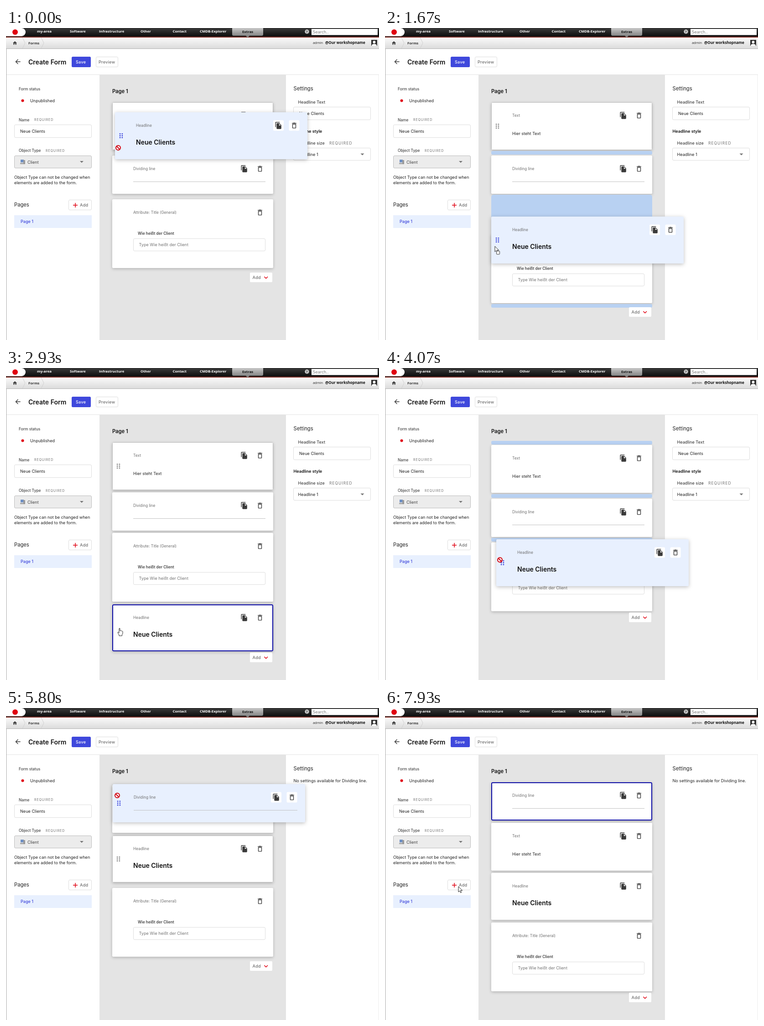
Recreate the animation shown at these times as an HTML page. Size 818 by 685 pixels, loop 8 s.

```html
<!DOCTYPE html>
<html lang="en">
<head>
<meta charset="utf-8">
<title>Form editor</title>
<style>
  html, body { margin: 0; width: 100%; height: 100%; overflow: hidden; background: #fff; }
  svg { display: block; }
  text { font-family: Inter, sans-serif; white-space: pre; }
  .bar { font-family: "Open Sans", sans-serif; }
  .search { font-family: "DejaVu Sans", sans-serif; }
  .card { filter: drop-shadow(0 2px 3px rgba(0, 0, 0, .22)); }
  .ghost { filter: drop-shadow(0 2px 4px rgba(0, 0, 0, .25)); }
</style>
</head>
<body>
<svg width="818" height="685" viewBox="0 0 818 685">
  <defs>
    <linearGradient id="dark" x2="0" y2="1"><stop stop-color="#3a3a3a"/><stop offset="1" stop-color="#0c0c0c"/></linearGradient>
    <linearGradient id="tab" x2="0" y2="1"><stop stop-color="#c9c9c9"/><stop offset="1" stop-color="#858585"/></linearGradient>
    <linearGradient id="crumbs" x2="0" y2="1"><stop stop-color="#fafafa"/><stop offset="1" stop-color="#dcdcdc"/></linearGradient>
  </defs>
  <g id="page"></g>
  <g id="live"></g>
</svg>
<script>
const LOOP = 8000;
const BLUE = '#3f48dc', RED = '#e00010', GREY = '#6f6f6f', INK = '#222', PALE = '#e8f0fe';
const ICONS = {
  copy: 'M16 1H4c-1.1 0-2 .9-2 2v14h2V3h12V1zm-1 4l6 6v10c0 1.1-.9 2-2 2H7.99C6.89 23 6 22.1 6 21l.01-14c0-1.1.89-2 1.99-2h7zm-1 7h5.5L14 6.5V12z',
  trash: 'M6 19c0 1.1.9 2 2 2h8c1.1 0 2-.9 2-2V7H6v12zM8 9h8v10H8V9zm7.5-5l-1-1h-5l-1 1H5v2h14V4z',
  back: 'M20 11H7.83l5.59-5.59L12 4l-8 8 8 8 1.41-1.41L7.83 13H20v-2z',
  home: 'M10 20v-6h4v6h5v-8h3L12 3 2 12h3v8z',
};

// y is the vertical middle of the capitals
const text = (x, y, str, size = 9.1, weight = 400, fill = INK, extra = '') =>
  `<text x="${x}" y="${y + size * .364}" font-size="${size}" font-weight="${weight}" fill="${fill}" ${extra}>${str}</text>`;
const rect = (x, y, w, h, fill, extra = '') =>
  `<rect x="${x}" y="${y}" width="${w}" height="${h}" fill="${fill}" ${extra}/>`;
const box = (x, y, w, h, fill = '#fff', stroke = '#dedede') =>
  rect(x + .5, y + .5, w - 1, h - 1, fill, `rx="2.5" stroke="${stroke}"`);
const path = (d, fill, extra = '') => `<path d="${d}" fill="${fill}" ${extra}/>`;
const line = (d, stroke, width) => path(d, 'none', `stroke="${stroke}" stroke-width="${width}"`);
const icon = (name, x, y, fill = '#3a3a3a', size = 16.8) =>
  path(ICONS[name], fill, `transform="translate(${x - size / 2} ${y - size / 2}) scale(${size / 24})"`);
const caret = (x, y) => path(`M${x - 4} ${y - 2}h8l-4 4z`, '#757575');
const required = (x, y, size) => text(x, y, 'REQUIRED', size, 400, GREY, `letter-spacing="${size * .13}"`);
const button = (x, y, str, fill = GREY) => text(x, y, str, 9.1, 500, fill, 'letter-spacing=".25"');

function topBar() {
  const nav = [[68, 'my-area'], [140, 'Software'], [204, 'Infrastructure'], [295, 'Other'], [365.5, 'Contact'], [425, 'CMDB-Explorer']];
  const bold = (x, y, str, fill, size = 7.8, weight = 700) => text(x, y, str, size, weight, fill, 'class="bar"');
  return rect(0, 0, 818, 19, 'url(#dark)') + rect(0, 19, 818, 2, '#8a3a32') +
    path('M0 0h34a9 9 0 0 1 0 18H0z', '#fff') + `<circle cx="20" cy="9" r="6" fill="${RED}"/>` +
    nav.map(([x, str]) => bold(x, 7.5, str, '#fff')).join('') +
    path('M496 0h68v14q0 3-3 3h-62q-3 0-3-3z', 'url(#tab)') + path('M526 17h8l-4 4z', '#858585') +
    bold(518, 8, 'Extras', '#111') +
    '<circle cx="660" cy="8" r="4.7" fill="#c8c8c8"/>' + bold(658, 8, '?', '#333', 7.5) +
    rect(670, 2, 145, 13.5, '#fff') + text(673, 8.5, 'Search..', 8.5, 400, '#777', 'class="search"') +
    rect(0, 21, 818, 24, 'url(#crumbs)') + rect(0, 45, 818, 1, '#b5b5b5') +
    line('M36 21l6 12-6 12M77 21l6 12-6 12', '#d0d0d0', 1) +
    icon('home', 19.5, 33, '#444', 11) + bold(49, 33, 'Forms', '#333') +
    bold(673, 32.5, 'admin', '#222', 7.4, 400) + bold(700, 32.5, '@Our workshopname', '#111', 8.1) +
    rect(801, 26, 13, 13, '#333') + '<circle cx="807.5" cy="31" r="2.9" fill="#fff"/>' +
    path('M802 39q0-4 5.5-4t5.5 4z', '#fff');
}

function leftPanel() {
  return text(28, 134, 'Form status', 8.4, 500, '#444') +
    `<circle cx="36.5" cy="159.5" r="3" fill="${RED}"/>` + text(53, 160, 'Unpublished') +
    text(28, 201.5, 'Name', 8.4, 500, '#444') + required(62, 201.5, 7) +
    box(18, 212, 170, 29) + text(31, 227, 'Neue Clients') +
    text(28, 269, 'Object Type', 8.4, 500, '#444') + required(87, 269, 7) +
    box(18, 280, 170, 28, '#ececec', '#bdbdbd') +
    rect(32, 289, 7, 6, '#6d8fc4') + rect(31, 296, 8, 3, '#aaa') + rect(38, 290, 4, 9, '#9b9b9b') +
    text(47, 294.5, 'Client', 9.1, 400, '#444') + caret(166, 294) +
    text(18, 328, 'Object Type can not be changed when') + text(18, 340, 'elements are added to the form.') +
    text(18, 387.5, 'Pages', 11.2) + box(137, 377, 51, 23) +
    line('M147 389h10M152 384v10', RED, 1.5) + button(162, 389, 'Add') +
    rect(18, 411, 170, 28, PALE) + text(32, 425, 'Page 1', 9.1, 500, BLUE);
}

page.innerHTML = topBar() + rect(0, 46, 1, 639, '#a8a8a8') + rect(1, 102, 817, 1, '#e4e4e4') +
  rect(205, 103, 409, 582, '#e4e4e4') + rect(817, 103, 1, 582, '#ececec') +
  icon('back', 26, 74) + text(49, 74.5, 'Create Form', 14, 600, '#111') +
  rect(144, 63, 42, 23, BLUE, 'rx="2.5"') + button(153, 75, 'Save', '#fff') +
  box(197, 63, 49, 23) + button(203, 75, 'Preview') + leftPanel() +
  text(233, 138.5, 'Page 1', 11.2, 600, '#111') + text(630.5, 133, 'Settings', 11.2);

const headlineSettings = text(640.5, 162.5, 'Headline Text', 9.1, 500, '#444') +
  box(630, 173, 170, 29) + text(643, 188, 'Neue Clients') +
  text(630.5, 227, 'Headline style', 9.1, 600, '#111') +
  text(640.5, 252.5, 'Headline size', 9.1, 500, '#444') + required(709, 252.5, 8.4) +
  box(630, 263, 170, 28) + text(640.5, 277.5, 'Headline 1') + caret(781.5, 277.5);
const lineSettings = text(630.5, 160, 'No settings available for Dividing line.');

const TOP = 162.5, GAP = 5.7, ZONE = 6.8, OPEN = 76.7;
const HEIGHT = { text: 105, line: 83.5, attr: 150.5, head: 102.5 };
const LABEL = { text: 'Text', line: 'Dividing line', attr: 'Attribute: Title (General)', head: 'Headline' };

// zones and opens refer to slots: slot n lies before item n
const PHASES = [
  { end: 2630, drag: 'head', order: ['text', 'line', 'attr'], zones: [1, 2, 3], blue: 260, opens: [[2, 434, 2000], [3, 2000, 9999]] },
  { end: 3500, order: ['text', 'line', 'attr', 'head'], selected: 'head' },
  { end: 4430, drag: 'head', order: ['text', 'line', 'attr'], zones: [0, 1, 2], blue: 3660, opens: [[2, 4130, 9999]] },
  { end: 5450, order: ['text', 'line', 'head', 'attr'], selected: 'head' },
  { end: 6650, drag: 'line', order: ['text', 'head', 'attr'], zones: [0, 2, 3], blue: 6260, opens: [[0, 6260, 9999]] },
  { end: LOOP, order: ['line', 'text', 'head', 'attr'], selected: 'line' },
];
const HOVER = [[0, 'text'], [2980, 'head'], [3500, ''], [4800, 'head'], [4980, 'line'], [5450, 'head'], [6750, 'line'], [6850, '']];
const CURSOR = [[0, 'no'], [260, 'drag'], [2630, 'hand'], [3500, 'no'], [4130, 'drag'], [4430, 'hand'], [5450, 'no'], [6260, 'drag'], [6650, 'hand'], [6850, 'arrow']];
const GHOST_PATH = [
  [0, 239, 185], [200, 244, 250], [400, 238, 302], [530, 236, 303], [670, 233, 303], [1070, 233, 303],
  [1670, 233.5, 414.5], [1930, 234, 490], [2200, 236, 521], [3470, 238, 522], [3600, 240, 562], [3870, 244, 380],
  [4000, 244, 380], [4070, 244, 376], [4330, 240, 342], [5400, 237, 273], [5800, 234, 167], [6200, 236, 130], [6400, 236, 130]];
const CURSOR_PATH = [
  [0, 246, 263], [400, 245, 350], [530, 245, 351], [670, 242, 351], [1070, 242, 351],
  [1670, 241, 480], [1930, 243, 545], [2200, 245, 569], [2600, 249, 571], [2930, 249, 571], [3270, 247, 568],
  [3470, 247, 570], [3600, 249, 608], [3870, 252, 426], [4000, 252, 426], [4070, 252, 421], [4330, 248, 390],
  [4730, 248, 390], [5200, 247, 315], [5400, 246, 315], [5800, 244, 192], [6200, 245, 172], [6650, 245, 175],
  [7070, 218, 279], [7130, 217, 281], [7400, 201, 331], [7600, 201, 331], [7930, 161, 392]];

const stepAt = (list, t) => list.filter(([start]) => start <= t).pop()[1];
function pointAt(keys, t) {
  const i = keys.findIndex(([time]) => time > t);
  if (i < 0) return keys[keys.length - 1].slice(1);
  const [a, b] = [keys[i - 1], keys[i]], p = (t - a[0]) / (b[0] - a[0]);
  return [1, 2].map(k => a[k] + (b[k] - a[k]) * p);
}
const easeOut = (t, start) => 1 - (1 - Math.min(1, Math.max(0, (t - start) / 200))) ** 2;

function dots(x, y, fill) {
  let out = '';
  for (let i = 0; i < 6; i++) out += `<circle cx="${x + (i % 2 - .5) * 4.8}" cy="${y + ((i >> 1) - 1) * 4.2}" r="1.4" fill="${fill}"/>`;
  return out;
}

function card(kind, x, y, { w = 353, ghost, hover, selected }) {
  x = Math.round(x); y = Math.round(y);
  const h = Math.round(HEIGHT[kind]), left = x + 46, right = x + w, mid = y + 29;
  let out = rect(x, y, w, h, ghost ? PALE : '#fff', `rx="2.5" class="${ghost ? 'ghost' : 'card'}"`);
  if (selected) out += rect(x + 1, y + 1, w - 2, h - 2, 'none', 'rx="2" stroke="#0d0da6" stroke-width="2"');
  else if (hover) out += rect(x + .5, y + .5, w - 1, h - 1, 'none', 'rx="2" stroke="#bcbcbc"');
  if (ghost || hover) out += dots(x + 13.5, y + h / 2, ghost ? BLUE : '#858585');
  for (const [name, dx] of [['copy', 63.5], ['trash', 29]]) {
    if (kind === 'attr' && name === 'copy') continue;
    if (ghost) out += rect(right - dx - 11.5, mid - 11.5, 23, 23, '#fff', 'rx="2.5"');
    out += icon(name, right - dx, mid);
  }
  out += text(left, mid, LABEL[kind], 8.4, 400, GREY);
  if (kind === 'text') out += text(left, y + 68.5, 'Hier steht Text');
  if (kind === 'line') out += rect(left, y + 57, w - 63, 1, '#c2c2c2');
  if (kind === 'head') out += text(left, y + 65.5, 'Neue Clients', 14, 600, '#111');
  if (kind === 'attr') out += text(left + 10, y + 74.5, 'Wie heißt der Client', 8.4, 600, '#444') +
    box(left, y + 86, w - 63, 28) + text(left + 12.5, y + 100, 'Type Wie heißt der Client', 9.1, 400, '#757575');
  return out;
}

function pointer(type, x, y) {
  const outline = 'stroke="#111" stroke-width=".9" stroke-linejoin="round"';
  let shape;
  if (type === 'no') shape = '<circle r="5" fill="#fff" fill-opacity=".6" stroke="#d4000c" stroke-width="2"/>' + line('M-3.5-3.5L3.5 3.5', '#d4000c', 2);
  else if (type === 'hand') shape = path('M-1 1Q0-.5 1 1V6l1-.6 1.2.8 1.2-.4 1 .9 1.1.2.5 1V12l-1.5 2.5V17H-1v-2L-3.7 10.500Q-4.500 8.500-2.500 9L-1 10.500z', '#fff', outline);
  else shape = path('M0 0v12l2.8-2.6 2 4.300 1.900-.9-2-4.200h3.900z', '#fff', outline);
  if (type === 'drag') shape += rect(3.5, 10.5, 7, 7, '#fff', 'stroke="#222" stroke-width=".9" rx="1"');
  return `<g transform="translate(${x} ${y})">${shape}</g>`;
}

function draw(t) {
  const phase = PHASES.find(p => t < p.end), hover = stepAt(HOVER, t);
  const { order, drag, selected, zones = [], opens = [], blue } = phase;
  let y = TOP, out = t < 5450 ? headlineSettings : lineSettings;
  for (let i = 0; i <= order.length; i++) {
    if (zones.includes(i)) {
      let size = ZONE;
      for (const [slot, start, stop] of opens)
        if (slot === i) size += OPEN * (easeOut(t, start) - easeOut(t, stop));
      if (t >= blue) out += rect(233, Math.round(y - 3), 353, Math.round(size + .7), '#b8d1f2', `rx="${size > 20 ? 5 : 3}"`);
      y += size;
    }
    if (i === order.length) break;
    const kind = order[i];
    out += card(kind, 233, y, { hover: kind === hover, selected: kind === selected });
    y += HEIGHT[kind] + GAP;
  }
  const addY = Math.round(y - 2.3);
  out += rect(535, addY, 49, 21, '#fff', 'rx="2"') + button(540.5, addY + 11, 'Add') +
    line(`M566.5 ${addY + 9}l3.700 3.700 3.700-3.700`, RED, 1.6);
  if (drag) out += card(drag, ...pointAt(GHOST_PATH, t), { w: 422, ghost: true });
  live.innerHTML = out + pointer(stepAt(CURSOR, t), ...pointAt(CURSOR_PATH, t));
}

function tick() {
  const t = performance.now() % LOOP;
  draw(Math.floor((t + 5) * .015) / .015 % LOOP);
  requestAnimationFrame(tick);
}
tick();
</script>
</body>
</html>
```
